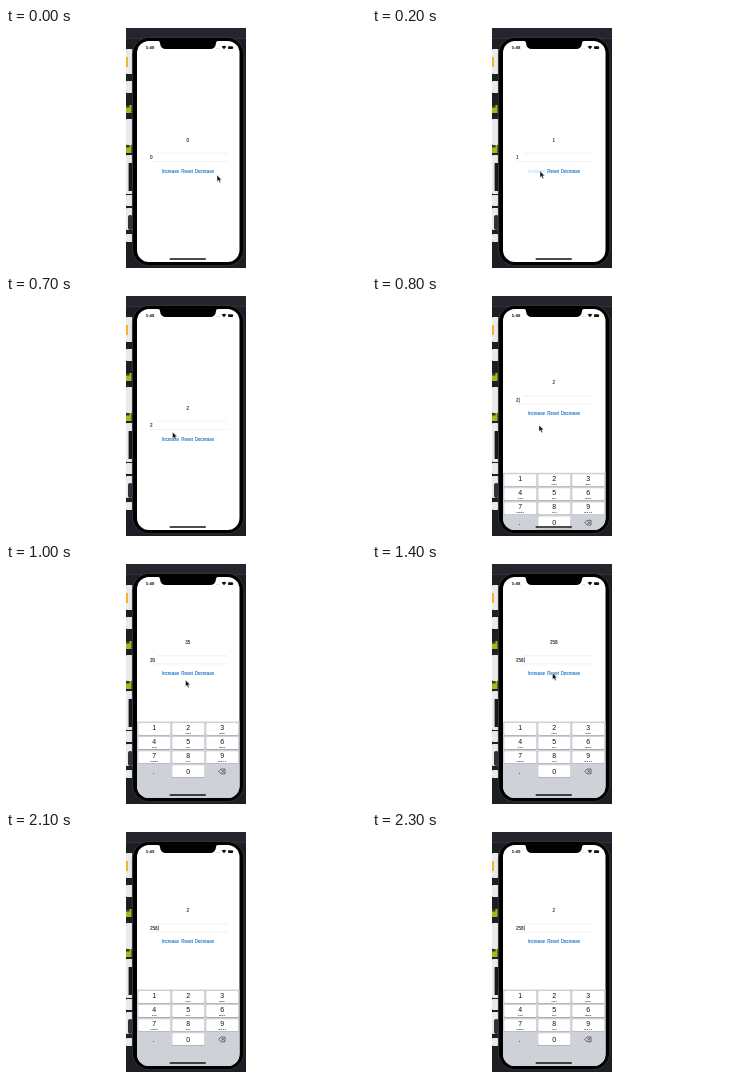
Animation of 360x240 px, one loop 2400 ms. Source, as an HTML page:

```html
<!DOCTYPE html>
<html lang="en">
<head>
<meta charset="utf-8">
<style>
  html, body { margin: 0; width: 100%; height: 100%; overflow: hidden; background: #fff; }
  svg { display: block; width: 100vw; height: 100vh; }
  text { font-family: "Liberation Sans", Arial, sans-serif; fill: #111; }
  .mid { text-anchor: middle; }
  .num { font-size: 4.6px; stroke: #111; stroke-width: .08px; }
  .btn text { font-size: 4.5px; fill: #1673c4; stroke: #1673c4; stroke-width: .1px; }
  .digit { font-size: 7px; }
  .letters { font-size: 2.2px; font-weight: bold; letter-spacing: .45px; }
</style>
</head>
<body>
<svg viewBox="0 0 360 240">
  <defs>
    <clipPath id="stage"><rect x="120" width="120" height="240"/></clipPath>
    <clipPath id="screen"><rect x="131" y="13" width="102.5" height="221" rx="12"/></clipPath>
  </defs>
  <g clip-path="url(#stage)">
    <rect x="120" width="120" height="240" fill="#1d1e24"/>
    <rect x="120" width="120" height="10" fill="#25262d"/>
    <path d="M120 10.5H240M236 37H240" stroke="#3a3b43" stroke-width=".7"/>
    <g id="desk"></g>
    <rect x="126.4" y="9.4" width="111.4" height="228.4" rx="17" fill="#000" stroke="#3b3c42" stroke-width=".8"/>
    <g clip-path="url(#screen)">
      <rect x="131" y="13" width="103" height="221" fill="#fff"/>
      <g id="form">
        <text id="total" class="num mid" x="181.8" y="113.6"/>
        <path d="M151 125.2H221M144 133.4H222" stroke="#e9e9eb" stroke-width=".6"/>
        <text id="field" class="num" x="144" y="131.2"/>
        <rect id="caret" y="126.8" width=".8" height="5.2" fill="#3978d8"/>
        <g class="btn">
          <text id="increase" x="155.8" y="144.6">Increase</text>
          <text id="reset" x="175.2" y="144.6">Reset</text>
          <text x="188.8" y="144.6">Decrease</text>
        </g>
      </g>
      <g id="keyboard"><rect x="131" y="157.5" width="103" height="77" fill="#ced1d8"/></g>
      <rect x="163.5" y="230.2" width="36.5" height="1.6" rx=".8" fill="#111"/>
      <text id="clock" x="139.8" y="21.2" font-size="4.3" font-weight="bold"/>
      <g fill="#111">
        <path d="M215.6 18.7Q218 16.8 220.4 18.7L218 21.2Z"/>
        <rect x="222" y="18.2" width="5" height="2.7" rx=".7"/>
        <path d="M227.3 19V20.2" stroke="#777" stroke-width=".4"/>
        <path d="M210.5 20.6H214" stroke="#aaa" stroke-width=".6" stroke-dasharray=".6 .5"/>
      </g>
    </g>
    <path d="M152 12H212V13Q210 13 210 15Q209.5 21 204 21H160Q154.5 21 154 15Q154 13 152 13Z"/>
    <path id="pointer" d="M0 0V6.6L1.5 5.3L2.6 7.7L3.7 7.2L2.7 4.8H4.7Z" fill="#111" stroke="#fff" stroke-width=".45"/>
  </g>
</svg>
<script>
const $ = id => document.getElementById(id);
const add = (parent, tag, attrs, text = '') => {
  const node = document.createElementNS('http://www.w3.org/2000/svg', tag);
  for (const name in attrs) node.setAttribute(name, attrs[name]);
  node.textContent = text;
  parent.append(node);
  return node;
};
const box = (parent, x, y, width, height, fill, rx = 0) =>
  add(parent, 'rect', { x, y, width, height, fill, rx });

// Window edge behind the phone
[[21, 25], [53, 12], [91, 26], [127, 39], [167, 11], [180, 22], [206, 8]]
  .forEach(([y, h]) => box($('desk'), 120, y, 6.5, h, '#e9eaeb', 1));
box($('desk'), 120, 29, 1.8, 10, '#f3ad16');
[77, 117].forEach(y => {
  box($('desk'), 120, y, 5.5, 8, '#9dbb1d');
  box($('desk'), 120, y, 3.5, 2.5, '#34391c');
});
box($('desk'), 122.6, 135, 3.4, 28, '#17181c');
box($('desk'), 122, 187, 4.5, 15, '#30323a', 2);

// Number pad
const letters = ['', 'ABC', 'DEF', 'GHI', 'JKL', 'MNO', 'PQRS', 'TUV', 'WXYZ'];
const key = (digit, col, row, label) => {
  const x = 132.2 + col * 34, y = 159 + row * 14.1, pad = $('keyboard');
  box(pad, x, y + .6, 32.2, 12, '#999ca2', 1.5);
  box(pad, x, y, 32.2, 12, '#fff', 1.5);
  add(pad, 'text', { class: 'digit mid', x: x + 16, y: y + (row < 3 ? 6.9 : 8.6) }, digit);
  add(pad, 'text', { class: 'letters mid', x: x + 16.2, y: y + 10.7 }, label);
};
letters.forEach((label, i) => key(i + 1, i % 3, Math.floor(i / 3), label));
key(0, 1, 3, '');
add($('keyboard'), 'text', { class: 'digit mid', x: 147.5, y: 209.5 }, '.');
add($('keyboard'), 'path', {
  d: 'M212.8 207.4L215 205H219V209.8H215ZM215.7 206.2L217.8 208.5M217.8 206.2L215.7 208.5',
  fill: 'none', stroke: '#222', 'stroke-width': .6
});

const latest = (steps, t) => steps.filter(([at]) => at <= t).pop()[1];
const totals = [[0, '0'], [200, '1'], [500, '2'], [900, '3'], [1000, '35'], [1100, '0'], [1200, '2'], [1300, '25'], [1400, '258'], [1600, '2']];
const fields = [...totals.slice(0, -1)];
const route = [[0, 211, 147], [100, 185, 144.5], [200, 168, 143], [500, 168, 143], [700, 166.5, 136],
  [800, 167, 129], [1000, 179.5, 116], [1100, 180.5, 109], [2400, 180.5, 109]];

function pointerAt(t) {
  const i = route.findIndex(([at]) => at > t);
  const [t0, x0, y0] = route[i - 1], [t1, x1, y1] = route[i];
  const k = (t - t0) / (t1 - t0);
  return [x0 + (x1 - x0) * k, y0 + (y1 - y0) * k];
}

function draw(time) {
  const t = Math.floor(time % 2400 / 100) * 100;
  const rise = Math.min(1, Math.max(0, (t - 700) / 200));
  const ease = 1 - (1 - rise) ** 2;
  const value = latest(fields, t);
  $('form').setAttribute('transform', `translate(0 ${-33.5 * ease})`);
  $('keyboard').setAttribute('transform', `translate(0 ${77 * (1 - ease)})`);
  $('total').textContent = latest(totals, t);
  $('field').textContent = value;
  $('caret').setAttribute('x', 144.3 + value.length * 2.56);
  $('caret').setAttribute('opacity', t >= 800 && ![1000, 1700, 1800].includes(t) ? 1 : 0);
  $('increase').setAttribute('opacity', t === 200 || t === 500 ? .25 : 1);
  $('reset').setAttribute('opacity', t === 1100 ? .25 : 1);
  $('clock').textContent = t < 1600 ? '5:48' : '5:49';
  $('pointer').setAttribute('transform', `translate(${pointerAt(t)})`);
  $('pointer').setAttribute('opacity', t < 1600 ? 1 : 0);
}

const start = performance.now();
function tick() {
  draw(performance.now() - start);
  requestAnimationFrame(tick);
}
tick();
</script>
</body>
</html>
```
